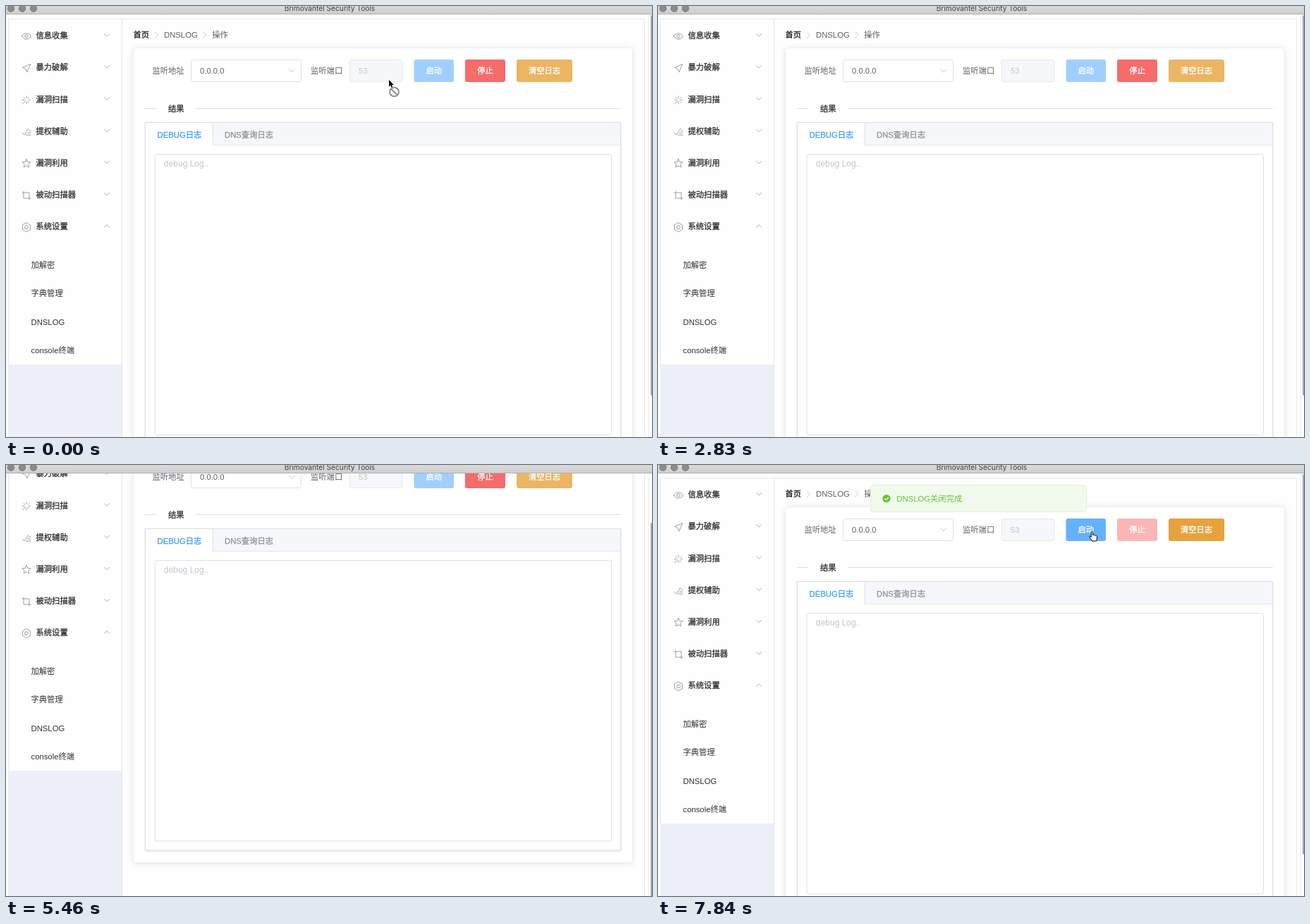
Recreate the animation shown at these times as an HTML page. Size 916 px wide and 612 px high, loop 8 s.

```html
<!DOCTYPE html>
<html lang="zh-CN">
<head>
<meta charset="utf-8">
<title>DNSLOG</title>
<style>
html, body { margin: 0; width: 100%; height: 100%; overflow: hidden; background: #fff; }
svg { display: block; width: 916px; height: 612px; }
text { font: 11.3px "Liberation Sans", "Noto Sans CJK SC", "Noto Sans CJK", sans-serif; white-space: pre; }
.mid { stroke-width: .3px; }
.bold { font-weight: 700; }
.inter { font-family: Inter, sans-serif; }
.card { filter: drop-shadow(0 1.6px 4px rgba(0,0,0,.1)); }
.tabs { filter: drop-shadow(0 1.6px 1.6px rgba(0,0,0,.12)); }
.line { fill: none; stroke-linecap: round; stroke-linejoin: round; }
</style>
</head>
<body>
<svg id="stage" viewBox="0 0 916 612" xmlns="http://www.w3.org/2000/svg"></svg>
<script>
const LOOP = 8000;
const INK = '#303133', TEXT = '#606266', MUTED = '#909399', FAINT = '#c0c4cc', EDGE = '#dcdfe6';
const BLUE = '#409eff', GREEN = '#67c23a', ORANGE = '#e6a23c', ORANGE_LIT = '#ebb563';

// ---- drawing helpers ----
const rect = (x, y, w, h, fill, stroke = 'none', r = 0, extra = '') =>
  `<rect x="${x}" y="${y}" width="${w}" height="${h}" rx="${r}" fill="${fill}" stroke="${stroke}" ${extra}/>`;
const line = (d, color, w = 1) => `<path class="line" d="${d}" stroke="${color}" stroke-width="${w}"/>`;
const label = (s, x, cy, color, cls = '', anchor = 'start') =>
  `<text x="${x}" y="${cy + 4.2}" fill="${color}" class="${cls}" text-anchor="${anchor}"` +
  `${cls === 'mid' ? ` stroke="${color}"` : ''}>${s}</text>`;
const at = (x, y, body, extra = '') => `<g transform="translate(${x} ${y})" ${extra}>${body}</g>`;
const chevron = (x, y, up) => line(up ? `M${x - 3.6} ${y + 1.8}l3.6-3.6l3.6 3.6` : `M${x - 3.6} ${y - 1.8}l3.6 3.6l3.6-3.6`, '#a3a6ad', .9);
const crumb = x => line(`M${x - 2} 37l4 4.2l-4 4.2`, FAINT, .9);
const button = (id, x, w, s) => rect(x, 76, w, 32, '#fff', 'none', 3, `id="${id}"`) + label(s, x + w / 2, 92, '#fff', 'mid', 'middle');

const polar = (n, r, turn) => Array.from({ length: n }, (_, i) => {
  const a = turn + i * 2 * Math.PI / n, q = Array.isArray(r) ? r[i % r.length] : r;
  return (q * Math.cos(a)).toFixed(2) + ' ' + (q * Math.sin(a)).toFixed(2);
});
const ring = r => `M${-r} 0a${r} ${r} 0 1 0 ${2 * r} 0a${r} ${r} 0 1 0 ${-2 * r} 0`;

const menu = [
  ['信息收集', 'M-6.5 0C-3.5-5.6 3.5-5.6 6.5 0C3.5 5.6-3.5 5.6-6.5 0Z' + ring(2.2)],
  ['暴力破解', 'M5.5-5.5L-5.5-.8L-1.2 1L.6 5.5Z'],
  ['漏洞扫描', 'M-5.5 5.5L-1 1M0-5.5V-3M0 3V5M-5.5 0H-3M3 0H5.5M-3.8-3.8L-2-2M2-2L3.8-3.8M2 2L3.8 3.8'],
  ['提权辅助', 'M-6 1.5L-3.2 4.5L3-4.5M-.5 4.5H6M1.5 1.5H6M3.5-1.5H6'],
  ['漏洞利用', 'M' + polar(10, [6.4, 3], -Math.PI / 2).join('L') + 'Z'],
  ['被动扫描器', 'M-6-4H4V6M-4-6V4H6'],
  ['系统设置', 'M' + polar(6, 6.4, -Math.PI / 2).join('L') + 'Z' + ring(2.5)]
];

function sidebar() {
  let s = rect(3, 509, 161, 300, '#eceff8') + line('M3.5 19V509M164.5 19V800', '#e6e6e8');
  menu.forEach(([name, icon], i) => {
    const y = 42 + i * 45.2;
    s += at(29, y + 1, line(icon, MUTED, .9)) + label(name, 42.5, y, INK, 'mid') + chevron(143, y - .8, i === 6);
  });
  ['加解密', '字典管理', 'DNSLOG', 'console终端'].forEach((name, i) => {
    s += label(name, 35.5, 367.6 + i * 40.35, INK);
  });
  return s;
}

function panel() {
  return label('首页', 180.5, 41.2, INK, 'bold') + crumb(213.5) + label('DNSLOG', 224, 41, TEXT) +
    crumb(282) + label('操作', 292.3, 41.2, TEXT) +
    rect(180.5, 59.5, 708, 580, '#fff', '#ebeef5', 4, 'class="card"') +
    label('监听地址', 207.5, 92, TEXT) + rect(262.5, 76.5, 156, 31, '#fff', EDGE, 3) +
    label('0.0.0.0', 275, 92, TEXT) + line('M401 90l4 4l4-4', FAINT, .9) +
    label('监听端口', 432, 92, TEXT) + rect(487, 76.5, 75, 31, '#f5f7fa', '#e4e7ed', 3) + label('53', 500, 92, FAINT) +
    button('start', 578.5, 56.5, '启动') + button('stop', 651, 57, '停止') + button('clear', 724, 79, '清空日志') +
    line('M197.5 145.5H213M269 145.5H871.5', EDGE) + label('结果', 230, 145.3, INK, 'mid') +
    rect(197.5, 165.5, 674, 456.5, '#fff', EDGE, 0, 'class="tabs"') +
    rect(198, 166, 673, 31, '#f5f7fa') + line('M198 197.5H871', '#e4e7ed') +
    rect(198, 166, 95, 32, '#fff') + line('M293.5 166V197', EDGE) +
    label('DEBUG日志', 214.5, 182.3, BLUE, 'mid') + label('DNS查询日志', 310, 182.3, MUTED, 'mid') +
    rect(211, 210.5, 647.5, 398.5, '#fff', EDGE, 3, 'id="log"') + label('debug Log..', 223.5, 223.8, FAINT, 'inter');
}

const arrow = '<path d="M0 0V9.6L2.2 7.6L3.8 11L5.4 10.3L3.9 7.1H6.9Z" fill="#000" stroke="#fff" stroke-width="1.2" paint-order="stroke"/>';
const beam = 'M-2.5-6Q0-6 0-4.5Q0-6 2.5-6M0-4.5V4.5M-2.5 6Q0 6 0 4.5Q0 6 2.5 6M-1.4 2H1.4';
const cursors = {
  none: '',
  arrow,
  ban: `<circle cx="7.5" cy="17" r="6.4" fill="#f4f4f4" stroke="#8c8c8c" stroke-width="1.9"/>` + line('M3.3 12.8L11.7 21.2', '#8c8c8c', 1.9) + arrow,
  beam: line(beam, '#fff', 2.6) + line(beam, '#111', 1.1),
  hand: '<path d="M-1.3 7V1C-1.3-.4 .9-.4 .9 1V5C1.4 4 3 4.2 3.1 5.4C3.8 4.7 5 5 5.1 6C6 5.4 7 6 7 7V9.5C7 11 6 11.6 6 13.5H0C-.4 11.5-3.6 9-3.6 7.6C-3.4 6.6-2 6.6-1.3 8Z" fill="#fff" stroke="#000" stroke-width="1" stroke-linejoin="round"/>'
};

const toast = rect(301.5, 28.5, 306, 38, '#f0f9eb', '#e1f3d8', 3.5) +
  `<circle cx="324" cy="47.6" r="5.6" fill="${GREEN}"/>` + line('M321.5 47.8l1.9 1.9l3.3-3.6', '#fff', 1.2) +
  label('DNSLOG关闭完成', 338.3, 47.5, GREEN);

const stage = document.getElementById('stage');
stage.innerHTML =
  `<defs><linearGradient id="bar" x2="0" y2="1"><stop stop-color="#dadada"/><stop offset="1" stop-color="#cecece"/></linearGradient></defs>` +
  rect(0, 0, 916, 612, '#fefefe') +
  `<g id="page">${line('M3 18.5H905.5V800', '#e8e9ec')}${sidebar()}${panel()}</g>` +
  line('M911.5 12V612', '#ebebeb') + rect(914, 13, 2, 540, '#a9a9a9', 'none', 1, 'id="thumb"') +
  `<g id="toast">${toast}</g>` +
  rect(0, 0, 916, 12, '#fff', 'none', 0, 'id="head"') + rect(0, 11, 916, 1, '#fff', 'none', 0, 'id="rule"') +
  `<g id="lights">${[7, 23, 39].map(x => `<circle cx="${x}" cy="3.5" r="4.8"/>`).join('')}</g>` +
  `<text id="title" x="459" y="7" text-anchor="middle" style="font:10.2px Inter,sans-serif">Brimovantel Security Tools</text>` +
  `<g id="cursor"></g>`;

const el = {};
stage.querySelectorAll('[id]').forEach(n => el[n.id] = n);
const set = (id, attrs) => { for (const k in attrs) el[id].setAttribute(k, attrs[k]); };

// ---- timeline: each track holds its value until the next key ----
const tracks = {
  active: [[0, 1], [1790, 0], [2090, 1], [3420, 0], [5020, 1]],
  clear: [[0, ORANGE_LIT], [1790, ORANGE], [2090, ORANGE_LIT], [3420, '#e9ac50'], [3540, ORANGE],
    [5020, '#e9ac50'], [5170, ORANGE_LIT], [7390, ORANGE]],
  start: [[0, '#a0cfff'], [7390, BLUE], [7840, '#66b1ff']],
  stop: [[0, '#f56c6c'], [6940, '#f78989'], [7390, '#fab6b6']],
  log: [[0, EDGE], [6200, FAINT], [6640, EDGE]],
  scroll: [[0, 0], [5460, 75], [5610, 72], [5760, 50], [5900, 20], [6050, 0]],
  toast: [[0, [0, 0]], [7390, [-9, .75]], [7540, [0, 1]]],
  cursor: [
    [0, ['ban', 543, 105]], [150, ['ban', 570, 98]], [300, ['ban', 610, 84]], [450, ['ban', 629, 76]],
    [600, ['arrow', 520, 118]], [750, ['arrow', 172, 330]], [900, ['arrow', 86, 590]], [1050, ['none', 0, 0]],
    [2680, ['beam', 235.5, 36]], [2830, ['none', 0, 0]],
    [3980, ['beam', 725, 283]], [4130, ['beam', 790, 420]], [4280, ['arrow', 868, 596]], [4430, ['none', 0, 0]],
    [6200, ['beam', 731.5, 320.5]], [6340, ['beam', 725, 275]], [6490, ['beam', 713, 225]],
    [6640, ['arrow', 700, 178]], [6790, ['arrow', 688, 130]], [6940, ['hand', 681, 100]], [7090, ['hand', 680, 98]],
    [7390, ['ban', 680, 98]], [7690, ['ban', 656, 97]], [7840, ['hand', 615.5, 94.5]]
  ]
};
const value = (name, t) => {
  let v;
  for (const [time, x] of tracks[name]) if (time <= t) v = x;
  return v;
};

let shape = '';
function render(t) {
  const on = value('active', t), scroll = value('scroll', t);
  set('head', { fill: on ? 'url(#bar)' : '#f6f6f6' });
  set('rule', { fill: on ? '#b1b1b1' : '#d6d6d6' });
  set('lights', { fill: on ? '#8b8b8b' : '#d6d6d6', stroke: on ? '#777' : '#cacaca', 'stroke-width': .8 });
  set('title', { fill: on ? '#404040' : '#a2a2a2' });
  for (const id of ['start', 'stop', 'clear']) set(id, { fill: value(id, t) });
  set('log', { stroke: value('log', t) });
  set('page', { transform: `translate(0 ${-scroll})` });
  set('thumb', { y: 13 + scroll * .92 });
  const [dy, alpha] = value('toast', t);
  set('toast', { transform: `translate(0 ${dy})`, opacity: alpha });
  const [kind, x, y] = value('cursor', t);
  if (kind !== shape) el.cursor.innerHTML = cursors[shape = kind];
  set('cursor', { transform: `translate(${x} ${y})` });
}

const begin = performance.now();
function tick() {
  render((performance.now() - begin) % LOOP);
  requestAnimationFrame(tick);
}
render(0);
requestAnimationFrame(tick);
</script>
</body>
</html>
```
